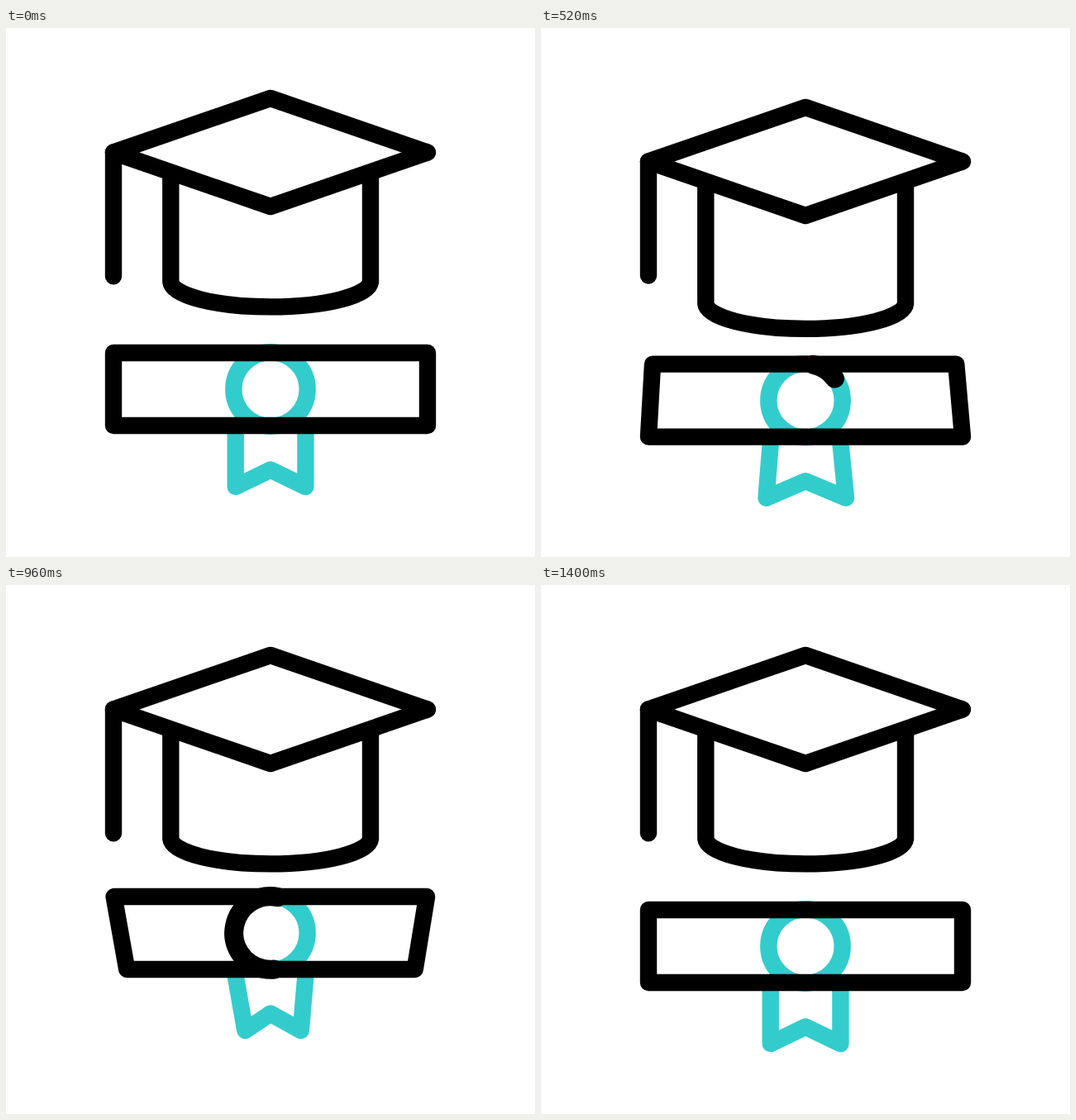
An HTML page for the animation above (1480 ms loop, 640 by 640 pixels).

```html
<!DOCTYPE html>
<html lang="en">
<head>
<meta charset="utf-8">
<title>Graduation</title>
<style>
  html, body { margin: 0; width: 100%; height: 100%; overflow: hidden; background: #fff; }
  svg { display: block; width: 100%; height: 100%; }
  path, circle { fill: none; stroke: #000; stroke-width: 20.4; stroke-linejoin: round; }
  .seal { stroke: #3cc; }
  #tassel, #trim { stroke-linecap: round; }
  #trim { stroke-width: 23; }
</style>
</head>
<body>
<svg viewBox="0 0 640 640">
  <path id="body"/>
  <path id="tassel"/>
  <path id="board" d="M130 150.5 320 85 510 150.5 320 216Z"/>
  <g id="scroll">
    <path id="ribbon" class="seal"/>
    <circle class="seal" cx="320" cy="437" r="44.7"/>
    <circle id="trim" cx="320" cy="437" r="44.3" pathLength="360" transform="rotate(-78 320 437)"/>
    <path id="sheet"/>
  </g>
</svg>
<script>
  const LOOP = 1480, STEP = 40;
  const el = id => document.getElementById(id);
  const [body, tassel, board, scroll, ribbon, trim, sheet] =
    ['body', 'tassel', 'board', 'scroll', 'ribbon', 'trim', 'sheet'].map(el);

  // Eased value at time t from [time, value] pairs
  function ease(t, ...keys) {
    if (t <= keys[0][0]) return keys[0][1];
    for (let i = 1; i < keys.length; i++) {
      const [t0, v0] = keys[i - 1], [t1, v1] = keys[i];
      if (t < t1) {
        const u = (t - t0) / (t1 - t0);
        return v0 + (v1 - v0) * u * u * (3 - 2 * u);
      }
    }
    return keys[keys.length - 1][1];
  }

  const hop = t => ease(t, [88, 0], [281, -48], [466, 32], [590, -20], [680, 0]);
  const bounce = t => ease(t, [395, 0], [728, 43], [1042, -28], [1250, 18], [1400, 0]);

  function drawCap(t) {
    const top = hop(t), base = 307 + hop(t - 29);
    const cut = ease(t, [88, 0], [281, -24], [466, -14], [680, 0]);
    board.setAttribute('transform', `translate(0 ${top})`);
    body.setAttribute('d', `M199.3 ${174 + top}V${base}A120.9 31.3 0 0 0 441 ${base}V${174 + top}`);
    tassel.setAttribute('d', `M130 ${150.5 + top}V${300.3 + top + cut}`);
  }

  function drawScroll(t) {
    const flare = ease(t, [395, 0], [690, 1], [1000, 0]);
    const taper = ease(t, [690, 0], [1000, 1], [1400, 0]);
    scroll.setAttribute('transform', `translate(0 ${bounce(t)})`);
    sheet.setAttribute('d', `M${130 + 13 * flare} 393H${510 - 20 * flare}` +
      `L${510 - 16 * taper} 481H${130 + 17 * taper}Z`);
    ribbon.setAttribute('d', `M277.7 489L${277.7 - 13.5 * flare + 12.8 * taper} 555L320 534.5` +
      `L${362.4 + 17 * flare - 6.7 * taper} 555L362.4 489`);

    const from = ease(t, [680, 0], [1280, 360]), to = ease(t, [400, 0], [970, 360]);
    trim.style.display = to - from > 0.5 ? '' : 'none';
    trim.setAttribute('stroke-dasharray', `${to - from} 400`);
    trim.setAttribute('stroke-dashoffset', -from);
  }

  function frame() {
    const t = Math.floor(performance.now() % LOOP / STEP) * STEP;
    drawCap(t);
    drawScroll(t);
    requestAnimationFrame(frame);
  }
  frame();
</script>
</body>
</html>
```
